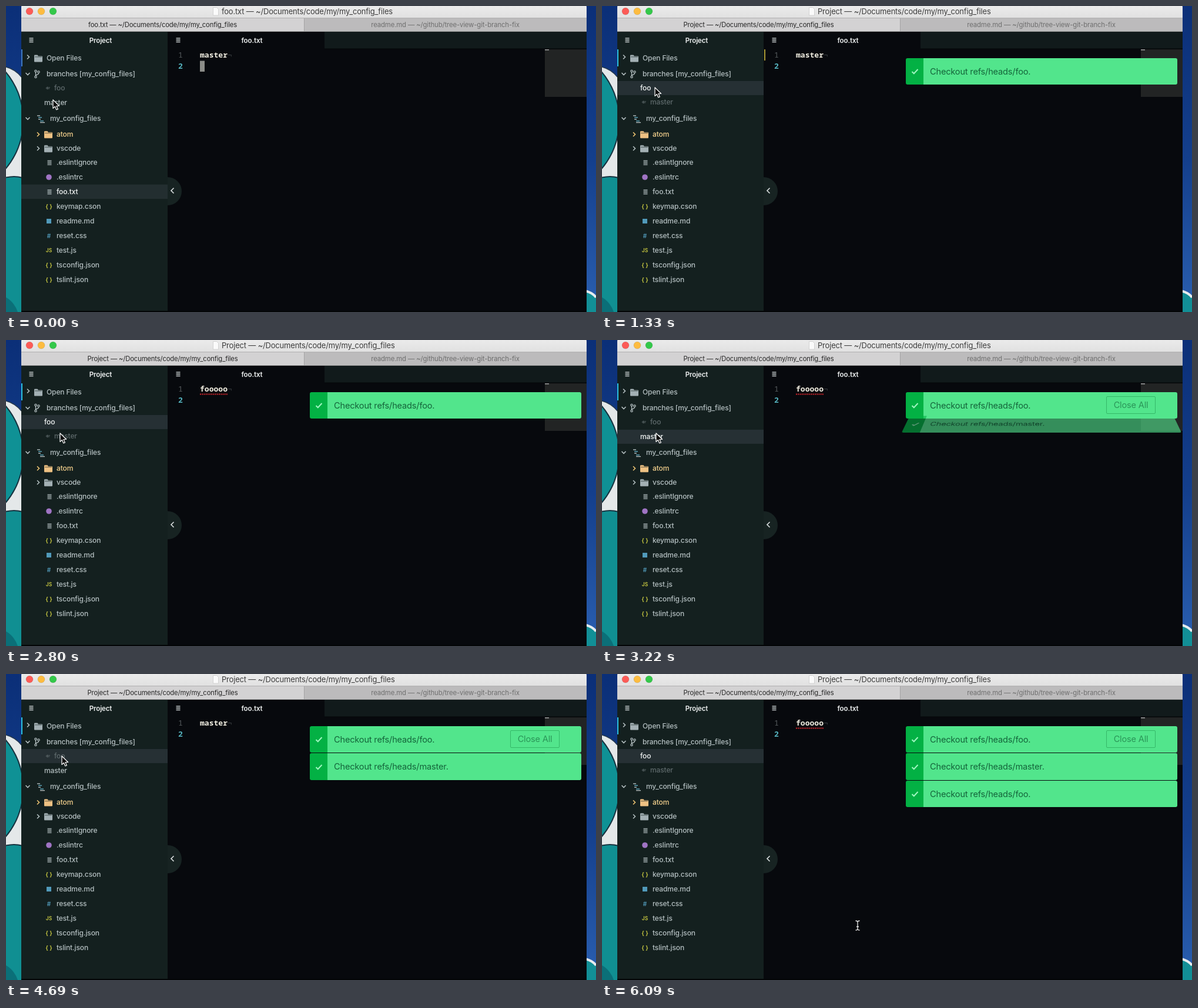
An HTML page for the animation above (6.16 s loop, 1004 by 522 pixels).

```html
<!DOCTYPE html>
<html lang="en">
<head>
<meta charset="utf-8">
<title>Branch checkout in a tree view</title>
<style>
html, body { margin: 0; width: 100%; height: 100%; overflow: hidden; background: #07090d; }
#stage { position: relative; width: 1004px; height: 522px; overflow: hidden; }
svg { position: absolute; left: 0; top: 0; }
#stage, text { font-family: Inter, "Open Sans", sans-serif; letter-spacing: -.012em; }
text { white-space: pre; }
.mono { font-family: "Noto Sans Mono", "DejaVu Sans Mono", monospace; letter-spacing: 0; font-size: 13.05px; }
.note {
  position: absolute; left: 516.5px; width: 462px; height: 45.5px; box-sizing: border-box;
  border-radius: 3px; overflow: hidden;
  background: linear-gradient(90deg, #03b144 30.5px, #52e58c 30.5px);
  color: #14643a; font-size: 14.6px; line-height: 47px; padding-left: 41.5px;
}
.note svg { left: 9.5px; top: 16.5px; }
#close {
  position: absolute; left: 341.5px; top: 7.5px; width: 82px; height: 28px; line-height: 29px;
  text-align: center; border: 1px solid #35b868; border-radius: 2px; color: #2b9558;
}
</style>
</head>
<body>
<div id="stage">
  <svg id="scene" width="1004" height="522" viewBox="0 0 1004 522">
    <defs>
      <linearGradient id="sky" x1="0" y1="0" x2="0" y2="1">
        <stop offset="0" stop-color="#0b2f78"/><stop offset=".5" stop-color="#143f8c"/><stop offset="1" stop-color="#2a5fb0"/>
      </linearGradient>
      <linearGradient id="bar" x1="0" y1="0" x2="0" y2="1">
        <stop offset="0" stop-color="#ececec"/><stop offset="1" stop-color="#d9d8d9"/>
      </linearGradient>
    </defs>
  </svg>
  <div id="notes"></div>
  <svg id="pointer" width="1004" height="522" viewBox="0 0 1004 522">
    <path id="arrow" d="M0 0V14.6L3.4 11.5L5.8 17L8.4 15.9L6 10.5H10.6Z" fill="#0a0a0a" stroke="#fff" stroke-width="1.2" stroke-linejoin="round"/>
    <path id="beam" d="M-3.5 -8Q0 -8 0 -5.5Q0 -8 3.5 -8M0 -6V6M-3.5 8Q0 8 0 5.5Q0 8 3.5 8M-2 2H2" fill="none" stroke="#e8e8e8" stroke-width="1.3"/>
  </svg>
</div>
<script>
const LOOP = 6160, STEP = 70, FLIP = 160;
const $ = id => document.getElementById(id);
const scene = $('scene');

function add(tag, attrs, text) {
  const el = document.createElementNS('http://www.w3.org/2000/svg', tag);
  for (const k in attrs) el.setAttribute(k, attrs[k]);
  if (text !== undefined) el.textContent = text;
  scene.append(el);
  return el;
}
const rect = (x, y, width, height, fill, more) => add('rect', { x, y, width, height, fill, ...more });
const path = (d, fill, more) => add('path', { d, fill, ...more });
const line = (d, stroke, width = 1.4, more) => path(d, 'none', { stroke, 'stroke-width': width, ...more });
const label = (s, x, mid, size, fill, more) =>
  add('text', { x, y: mid + size * .36, 'font-size': size, fill, ...more }, s);
const centred = { 'text-anchor': 'middle' };
const show = (el, on) => { el.style.display = on ? '' : 'none'; };

// desktop
rect(0, 0, 1004, 522, 'url(#sky)');
path('M0 104Q16 108 27 122V296H0Z', '#e4e8e9');
add('circle', { cx: -99, cy: 195, r: 128.5, fill: '#0f9195', stroke: '#15323f', 'stroke-width': 2 });
line('M0 104Q16 108 27 122', '#24384e', 1.5);
path('M-2 293Q14 289 28 293V524H-2Z', '#108f92', { stroke: '#15323f', 'stroke-width': 2 });
path('M0 497Q14 505 20 522H0Z', '#0b6f78');
path('M986 484Q998 488 1004 496V522H986Z', '#128f96');
line('M986 486Q998 489 1004 497', '#e6ecef', 4);

// window frame
rect(26, -3, 962, 40, 'url(#bar)', { rx: 5 });
rect(26, 20, 481, 24, '#d3d2d3');
rect(507, 20, 481, 24, '#bcbbbc');
rect(26, 20, 962, 1, '#b1b0b1');
rect(507, 21, 1, 22, '#a4a3a4');
rect(26, 43, 962, 1, '#8f8f8f');
[[40, '#fc5b57'], [60, '#fdbc40'], [80, '#34c84a']].forEach(([cx, fill]) =>
  add('circle', { cx, cy: 9, r: 6, fill, stroke: 'rgba(0,0,0,.15)', 'stroke-width': .7 }));
path('M352.500 2.500H358.500L361.500 5.500V16H352.500Z', '#fafafa', { stroke: '#c6c6c6', 'stroke-width': .7 });
const title = label('', 367, 9.5, 12.95, '#3c3c3c');
const tabTitle = label('', 266.5, 32, 11.25, '#262626', centred);
label('readme.md — ~/github/tree-view-git-branch-fix', 747.5, 32, 11.35, '#6f6f6f', centred);

// panes
rect(26, 44, 249, 478, '#14201f');
rect(275, 44, 713, 478, '#07090d');
rect(542, 44, 446, 29, '#111a1b');
rect(542, 72.500, 446, 1, '#050709');
rect(917, 74, 71, 81, '#222424');
rect(917, 74, 7, 1.5, '#a3a5a5');
path('M275 292A24 24 0 0 1 275 340Z', '#172322');
line('M285.500 310.500L281 315L285.500 319.500', '#d5dadb', 1.7);

const bars = (x, y, fill) => {
  for (let i = 0; i < 4; i++) rect(x - 3.5, y - 3.8 + i * 2.3, 7, 1.2, fill);
};
bars(43, 58, '#c9cfd0');
bars(293, 58, '#c9cfd0');
const heavy = { 'font-weight': 600 };
label('Project', 161, 58.5, 11.5, '#eef1f1', { ...centred, ...heavy });
label('foo.txt', 418.5, 58.5, 11.6, '#eef1f1', { ...centred, ...heavy });

// tree
const INK = '#b4bfc1', DIM = '#5e696b', LIT = '#f2f5f5', SEL = '#263034';
const item = (s, x, y, fill = INK) => label(s, x, y, 12.05, fill, { 'font-weight': 500 });
const right = (x, y, c) => line(`M${x - 2} ${y - 3.5}l3.500 3.500l-3.500 3.500`, c, 1.6);
const down = (x, y, c) => line(`M${x - 3.5} ${y - 2}l3.500 3.500l3.500 -3.500`, c, 1.6);
const folder = (x, y, c) => {
  path(`M${x - 7} ${y - 5}q0 -1 1 -1h4.500l1.500 2h6q1 0 1 1v8q0 1 -1 1h-12q-1 0 -1 -1z`, c);
  line(`M${x - 6} ${y - 2.7}h12`, '#14201f', .7);
};

const focusBar = rect(26, 74, 2, 29, '#2bc0df');
right(38, 87, INK);
folder(55, 89.5, '#a3b0b4');
item('Open Files', 69, 89);
down(37, 116, INK);
line('M50.500 112.500V119.500M50.500 118Q55.500 117 55.500 114.500', INK, 1.4);
[[50.5, 111], [50.5, 121], [55.5, 112.5]].forEach(([cx, cy]) =>
  add('circle', { cx, cy, r: 1.7, fill: '#14201f', stroke: INK, 'stroke-width': 1.2 }));
item('branches [my_config_files]', 69, 116);

const selFoo = rect(26, 128, 249, 24, SEL);
const selMaster = rect(26, 153, 249, 24, SEL);
const selFile = rect(26, 304.500, 249, 24.500, '#232e30');
const mark = y => line(`M68 ${y}l2.500 -2v4zM71 ${y - 1}h4M71 ${y + 1}h3`, DIM, .9);
const fooMark = mark(140), masterMark = mark(164);
const foo = item('foo', 82, 140), master = item('master', 65, 165);

down(37, 192, INK);
[[53, 186.5, 5], [55, 189.5, 6], [55, 192.5, 4], [58, 195.5, 6], [58, 198, 8]].forEach(([x, y, w], i) =>
  rect(x, y, w, 1.4, i % 2 ? '#5fa9c0' : INK));
item('my_config_files', 75, 192);

right(55, 219, '#f0c674');
folder(72, 219.5, '#eec183');
item('atom', 86, 218.5, '#f3cf8c');
right(55, 243, INK);
folder(72, 243.5, '#a3b0b4');
item('vscode', 86, 243);

const glyph = (s, y, fill, size = 10) => label(s, 73, y, size, fill, { ...centred, 'font-weight': 600 });
const files = [
  ['.eslintIgnore', 'list'], ['.eslintrc', 'dot'], ['foo.txt', 'list'], ['keymap.cson', '{ }'],
  ['readme.md', 'box'], ['reset.css', '#'], ['test.js', 'JS'], ['tsconfig.json', '{ }'], ['tslint.json', '{ }']
];
let openFile;
files.forEach(([name, icon], i) => {
  const y = 267 + i * 25;
  if (icon === 'list') bars(74, y, INK);
  else if (icon === 'dot') add('circle', { cx: 73, cy: y, r: 4.8, fill: '#a074c4' });
  else if (icon === 'box') rect(69, y - 4, 8, 8, '#519aba');
  else glyph(icon, y, icon === '#' ? '#519aba' : '#cbcb41', icon === 'JS' ? 8.5 : 10);
  const t = item(name, 86, y);
  if (name === 'foo.txt') openFile = t;
});

// editor
const mono = (s, x, y, fill, bold) =>
  add('text', { x, y, fill, class: 'mono', 'font-weight': bold ? 700 : 400 }, s);
mono('1', 293, 88, '#565b5e');
mono('2', 293, 107, '#56b6c2', true);
const code = mono('', 330, 88, '#f2efe2', true);
mono('¬', 377, 88, '#3c4043');
const gutter = rect(276, 74, 2, 19, '#a99a35');
const caret = rect(330, 93.500, 8, 18.500, '#8b8c88');
const squiggle = line('M330 92.500H378', '#d8262c', 2, { 'stroke-dasharray': '2 1.200' });
rect(26, 520, 962, 2, '#030506');

// notifications
const notes = [['foo', 1050], ['master', 3150], ['foo', 4900]].map(([branch, at], i) => {
  const el = document.createElement('div');
  el.className = 'note';
  el.style.top = 88.5 + i * 46.5 + 'px';
  el.innerHTML = '<svg width="13" height="13"><path d="M1.500 7L4.800 10.300L11.500 3" fill="none" stroke="#9df5bf" stroke-width="2"/></svg>' +
    `Checkout refs/heads/${branch}.` + (i ? '' : '<div id="close">Close All</div>');
  $('notes').append(el);
  return { el, at };
});

// time, x, y
const moves = [
  [0, 80, 160], [350, 80, 160], [700, 89, 140], [1330, 90, 139], [1820, 90, 139], [2240, 90, 148],
  [2660, 92, 159], [3640, 92, 159], [4060, 95, 147], [4410, 95, 140], [5390, 95, 140], [5950, 435, 429]
];
// value in force from each time on
const steps = {
  select: [[0, 'file'], [700, 'foo'], [2870, 'master'], [4550, 'foo']],
  head: [[0, 'master'], [1050, 'foo'], [3150, 'master'], [4900, 'foo']],
  text: [[0, 'master'], [1540, 'fooooo'], [3500, 'master'], [5110, 'fooooo']],
  dirty: [[0, false], [1190, true], [1680, false], [3290, true], [3640, false], [5040, true], [5320, false]],
  spell: [[0, false], [1750, true], [3500, false], [5320, true]]
};
const at = (key, t) => steps[key].filter(s => s[0] <= t).pop()[1];

function pointerAt(t) {
  const i = moves.findIndex(m => m[0] > t);
  if (i < 0) return moves[moves.length - 1].slice(1);
  const [t0, x0, y0] = moves[i - 1], [t1, x1, y1] = moves[i];
  const p = (t - t0) / (t1 - t0), e = p * p * (3 - 2 * p);
  return [x0 + (x1 - x0) * e, y0 + (y1 - y0) * e];
}

// a note swings down into place about its middle
function flip({ el, at }, t) {
  const left = 1 - Math.min(1, Math.max(0, (t - at) / FLIP));
  show(el, left < 1);
  el.style.opacity = 1 - .7 * left;
  el.style.transform = left
    ? `perspective(600px) translateY(${-26 * left}px) rotateX(${90 * left}deg)` : 'none';
}

function draw(t) {
  const select = at('select', t), head = at('head', t);
  const inFile = select === 'file', onMaster = head === 'master';
  const full = (inFile ? 'foo.txt' : 'Project') + ' — ~/Documents/code/my/my_config_files';
  title.textContent = tabTitle.textContent = full;
  focusBar.setAttribute('fill', inFile ? '#3f78c0' : '#2bc0df');
  show(selFile, inFile);
  openFile.setAttribute('fill', inFile ? LIT : INK);
  show(selFoo, select === 'foo');
  show(selMaster, select === 'master');

  foo.setAttribute('x', onMaster ? 82 : 65);
  foo.setAttribute('fill', onMaster ? DIM : LIT);
  master.setAttribute('x', onMaster ? 65 : 82);
  master.setAttribute('y', (onMaster ? 165 : 164) + 4.3);
  master.setAttribute('fill', !onMaster ? DIM : select === 'master' ? LIT : INK);
  show(fooMark, onMaster);
  show(masterMark, !onMaster);

  code.textContent = at('text', t);
  show(gutter, at('dirty', t));
  show(squiggle, at('spell', t));
  show(caret, inFile);

  notes.forEach(n => flip(n, t));
  show($('close'), t >= notes[1].at);

  const [x, y] = pointerAt(t), overCode = x > 300;
  show($('arrow'), !overCode);
  show($('beam'), overCode);
  $(overCode ? 'beam' : 'arrow').setAttribute('transform', `translate(${x} ${y})`);
}

const start = performance.now();
function tick(now) {
  const t = Math.max(0, now - start) % LOOP;
  draw(Math.floor(t / STEP) * STEP);
  requestAnimationFrame(tick);
}
draw(0);
requestAnimationFrame(tick);
</script>
</body>
</html>
```
